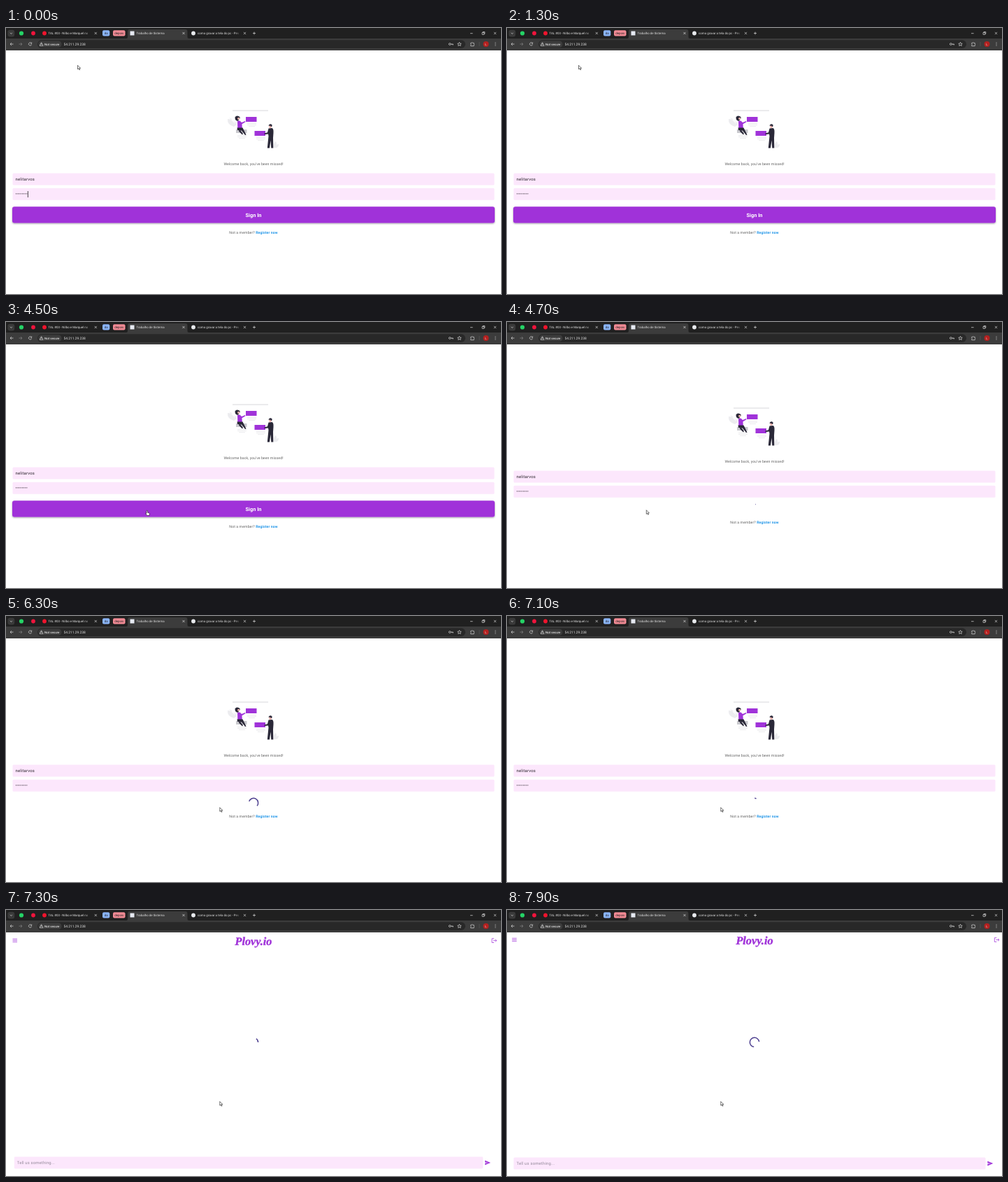
Recreate the animation shown at these times as an HTML page. Size 708 by 380 pixels, loop 8000 ms.

```html
<!DOCTYPE html>
<html lang="en">
<head>
<meta charset="utf-8">
<title>Sign in</title>
<style>
  html, body { margin: 0; width: 100%; height: 100%; overflow: hidden; background: #fff; }
  svg { display: block; width: 100vw; height: 100vh; }
  text { font-family: Roboto, sans-serif; text-rendering: geometricPrecision; white-space: pre; }
  .tab { font-size: 4.43px; fill: #e3e3e3; }
  .body { font-size: 5.17px; letter-spacing: .092px; fill: #616161; }
  .input { font-size: 5.9px; letter-spacing: .185px; fill: #2b252d; }
  .mid { text-anchor: middle; }
  .field { fill: #fce7fc; }
  .purple { fill: #a033d9; }
  .dark { fill: #2a2838; }
  .pale { fill: #e4e4e7; }
  .icon { fill: none; stroke: #dcdcdc; stroke-width: .7; }
  .accent { fill: none; stroke: #a033d9; stroke-width: .75; }
  .spin { fill: none; stroke: #4d3f8f; stroke-width: 1.5; }
</style>
</head>
<body>
<svg viewBox="0 0 708 380" preserveAspectRatio="none">
  <defs>
    <linearGradient id="fade">
      <stop offset="0" stop-color="#202020" stop-opacity="0"/>
      <stop offset=".8" stop-color="#202020"/>
    </linearGradient>
    <filter id="shadow" x="-5%" y="-30%" width="110%" height="180%">
      <feDropShadow dx="0" dy="1" stdDeviation="1" flood-color="#000" flood-opacity=".38"/>
    </filter>
    <path id="close" d="M-1.6-1.6 1.6 1.6M1.6-1.6-1.6 1.6"/>
    <path id="lines" d="M0 0H13M0 2H13M2 4H11" stroke="#e0e0e3" stroke-width=".6"/>
  </defs>
  <rect width="708" height="380" fill="#fff"/>

  <g id="login">
    <g id="upper">
      <g id="art">
        <path class="pale" d="M324 117.3h51v1.5h-51z"/>
        <path d="M317 130q-1 8 9 11l4-3q-3-8-13-8zM319 128q6 2 9 9" fill="#ececef"/>
        <path d="M383 171q-1-7 3-9 2 3 0 9zM386 171q0-5 4-5 0 4-3 5z" fill="#ececef"/>
        <path class="purple" d="M343 127h15.5v7H343zM355.5 147H371v7h-15.5z"/>
        <use href="#lines" x="345" y="136.5"/>
        <use href="#lines" x="331" y="153.5"/>
        <use href="#lines" x="358" y="156.5"/>
        <path d="M329 145h15.5v5H329z" fill="#c9c9ce"/>
        <path class="dark" d="M327.5 127.5q2-3 5-1.6 2.6.6 2 3l-2 2.4q1 1.500-1.500 1.500-3.500-.4-3.500-5.300z"/>
        <circle cx="332.6" cy="129.300" r="1.500" fill="#efb3ad"/>
        <path class="purple" d="M331 133l3.500-.5 2.500 2.500 5-2 .5 1.200-5 3 .3 6h-6.500z"/>
        <path class="dark" d="M330.500 142.500h8l3 6 2 4-1.500.5-5-6.500-6-.5zM334 145l5 6-1 1.500-5-5z"/>
        <circle cx="378" cy="141" r="1.900" fill="#efb3ad"/>
        <path class="dark" d="M375.700 140q0-2.800 3-2.700 2.500.5 1.700 3.200l-1.300.4-1.200-1.300z"/>
        <path class="dark" d="M375.500 143.500l5-.5q2.500 1 2 7l-.5 7 .3 14.500h-3l-.8-11-1.500 11h-3.200l1.700-17-.5-3-5.500.5v-1.500l4.500-1.200z"/>
      </g>
      <text class="body mid" x="354" y="196.200">Welcome back, you've been missed!</text>
      <rect class="field" x="9.500" y="207.500" width="689" height="17" rx="1.500"/>
      <rect class="field" x="9.500" y="228.800" width="689" height="17" rx="1.500"/>
      <text class="input" x="13.500" y="218">nelitarvos</text>
      <text class="input" x="13.500" y="239.400">••••••••</text>
      <rect id="caret" x="30.900" y="233" width=".8" height="9" fill="#222"/>
    </g>
    <g id="button">
      <rect class="purple" x="9" y="255.300" width="690" height="23.300" rx="3" filter="url(#shadow)"/>
      <text class="mid" x="354" y="269.600" font-size="7.38" font-weight="700" fill="#fff">Sign In</text>
    </g>
    <path id="loginSpin" class="spin"/>
    <text id="register" class="body mid" x="354" y="293.500">Not a member? <tspan font-weight="700" fill="#2196e8">Register now</tspan></text>
  </g>

  <g id="home">
    <rect y="32" width="708" height="348" fill="#fff"/>
    <path class="accent" d="M7.200 40.400h6.600M7.200 42.500h6.600M7.200 44.600h6.600"/>
    <text class="mid purple" x="354" y="49.200" style="font:italic 700 16.300px 'Liberation Serif',serif" stroke="#a033d9" stroke-width=".4">Plovy.io</text>
    <path class="accent" d="M700.300 39.700h-3v5.800h3M699.300 42.600h4.600M702.200 40.800l1.800 1.800-1.800 1.800"/>
    <path id="homeSpin" class="spin"/>
    <rect class="field" x="9.500" y="353.500" width="675" height="17" rx="1.500"/>
    <text class="input" x="13.500" y="364" style="fill:#94899a">Tell us something...</text>
    <path class="purple" d="M687.300 358.800l8 3.300-8 3.300v-2.600l5-.7-5-.7z"/>
  </g>

  <g id="browser">
    <rect width="708" height="32" fill="#202020"/>
    <path d="M0 15H172q2 0 2-2V5q0-3 3-3h79.500q3 0 3 3v8q0 2 2 2H708v17H0z" fill="#3c3c3c"/>
    <rect x="2.500" y="2.700" width="9.700" height="9.700" rx="2.800" fill="#3a3a3a"/>
    <path class="icon" d="M5.800 6.800l1.600 1.600L9 6.800"/>
    <circle cx="22" cy="7.500" r="3.100" fill="#25d366"/>
    <circle cx="39" cy="7.500" r="2.900" fill="#f0143c"/>
    <circle cx="55" cy="7.500" r="2.900" fill="#f0142d"/>
    <text class="tab" x="60.500" y="9.100">TAL #03 - Nilbo e Marquel no</text>
    <rect x="112" y="3" width="13" height="9" fill="url(#fade)"/>
    <rect x="138" y="3.200" width="10.300" height="8.300" rx="2" fill="#8ab4f8"/>
    <text class="tab mid" x="143.100" y="9" style="fill:#202020">da</text>
    <rect x="153" y="3.200" width="17.500" height="8.300" rx="2" fill="#f28b95"/>
    <text class="tab mid" x="161.800" y="9" style="fill:#202020">depois</text>
    <rect x="177.500" y="4.500" width="6" height="6" fill="#e6eaf2"/>
    <text class="tab" x="186.500" y="9.100">Trabalho de Sistema</text>
    <circle cx="268" cy="7.500" r="2.900" fill="#e8eaed"/>
    <text class="tab" x="274" y="9.100">como gravar a tela do pc - Pes</text>
    <rect x="327" y="3" width="11" height="9" fill="url(#fade)"/>
    <g class="icon">
      <use href="#close" x="128.300" y="7.500"/>
      <use href="#close" x="254" y="7.500"/>
      <use href="#close" x="341.500" y="7.500"/>
      <use href="#close" x="699.500" y="7.500"/>
      <path d="M353 7.500h4M355 5.500v4M664 7.700h3.600M681 6.500h2.800v2.800H681zM682 6.400v-.9h2.800v2.800h-.9"/>
      <path d="M10.500 23H6M8 21l-2 2 2 2"/>
      <path d="M18.500 23H23M21 21l2 2-2 2" stroke="#868686"/>
      <path d="M36.300 21.700a2.100 2.100 0 1 0 .3 1.800M36.700 20.500v1.700H35"/>
    </g>
    <rect x="45" y="17.300" width="612" height="11.700" rx="5.850" fill="#282828"/>
    <rect x="46.200" y="18.500" width="33.300" height="9.300" rx="4.650" fill="#3c3c3c"/>
    <path d="M50.600 20.700l2.500 4.500h-5z" class="icon"/>
    <path d="M50.600 22.200v1.500" class="icon" stroke-width=".5"/>
    <text class="tab" x="55" y="24.700" font-weight="500">Not secure</text>
    <text x="82.500" y="24.800" font-size="4.900" fill="#e3e3e3">54.211.29.238</text>
    <g class="icon">
      <circle cx="634.800" cy="23" r="1.400"/>
      <path d="M636.200 23h3.300v1.400M638 23v1.200"/>
      <path d="M648.500 20.400l.8 1.700 1.900.2-1.400 1.300.4 1.900-1.700-1-1.700 1 .4-1.900-1.400-1.300 1.900-.2z"/>
      <path d="M664.700 21.400h1.400q.7-1.800 1.500 0h1.600v1.500q1.700.7 0 1.500v1.300h-4.500v-1.400q1-.7 0-1.500z"/>
      <path d="M677 20v6" stroke="#626262" stroke-width=".5"/>
    </g>
    <circle cx="686.500" cy="23" r="4" fill="#b5201f"/>
    <text class="tab mid" x="686.500" y="24.700">L</text>
    <path d="M700 21v.01M700 23v.01M700 25v.01" stroke="#e3e3e3" stroke-width="1" stroke-linecap="round"/>
  </g>

  <g id="pointer" fill="#fff" stroke="#111" stroke-width=".6" stroke-linejoin="round">
    <path id="arrow" d="M0 0v5.600l1.300-1.200 1 2.200 1-.5-1-2h1.800z"/>
    <path id="hand" d="M.8 0q.8 0 .8 .8v2.200l2 .5q.9.300.8 1.200l-.5 2.500H.800L-1.200 4.500q-.2-1 .6-.8l.6.500V.8Q0 0 .8 0z"/>
  </g>
</svg>
<script>
const LOOP = 8000, STEP = 100;
const LOADING = 4650, SWITCH = 7144, SWITCH_TIME = 300;
const caretToggles = [300, 800, 1300, 1800, 2400, 2900, 3400, 3900, 4400];
// Pointer stops: time, x, y
const pointerStops = [
  [0, 102.5, 53.3], [2300, 102.5, 53.3], [2500, 96.3, 51.2], [3300, 96.3, 51.2],
  [3500, 505, 103], [3800, 505, 103], [4500, 201, 269.3], [4600, 201, 269.3],
  [4700, 199.3, 268.7], [5000, 199.3, 268.7], [5800, 305.8, 273.6], [LOOP, 305.8, 273.6]
];
const $ = id => document.getElementById(id);
const clamp = v => Math.min(1, Math.max(0, v));

function bezier(x1, y1, x2, y2) {
  const at = (a, b, s) => 3 * a * s * (1 - s) ** 2 + 3 * b * s * s * (1 - s) + s ** 3;
  return x => {
    let lo = 0, hi = 1;
    for (let i = 0; i < 24; i++) {
      const s = (lo + hi) / 2;
      if (at(x1, x2, s) < x) lo = s; else hi = s;
    }
    return at(y1, y2, lo);
  };
}
const standard = bezier(.4, 0, .2, 1);
const zoomOut = bezier(.05, .7, .1, 1);
const smooth = p => p * p * (3 - 2 * p);

// Material indeterminate spinner
function spinnerPath(cx, cy, time) {
  const r = 6.65, p = time / 1333 % 1;
  const head = standard(clamp(p * 2)), tail = standard(clamp(p * 2 - 1));
  const start = Math.PI * (-.5 + tail * 1.5 + time / 2222 * 2 + p * .5);
  const sweep = Math.max((head - tail) * 1.5 * Math.PI, .08);
  const point = a => `${cx + r * Math.cos(a)} ${cy + r * Math.sin(a)}`;
  return `M${point(start)}A${r} ${r} 0 ${+(sweep > Math.PI)} 1 ${point(start + sweep)}`;
}

const show = (id, on) => $(id).setAttribute('visibility', on ? 'inherit' : 'hidden');
const move = (id, x, y) => $(id).setAttribute('transform', `translate(${x} ${y})`);

function layer(id, scale, opacity) {
  $(id).setAttribute('transform', `translate(354 206) scale(${scale}) translate(-354 -206)`);
  $(id).setAttribute('opacity', opacity);
}

function render(t) {
  const loading = t >= LOADING && t < SWITCH;
  move('upper', 0, loading ? 5 : 0);
  move('register', 0, loading ? -5.2 : 0);
  show('button', !loading);
  show('loginSpin', loading);
  if (loading) $('loginSpin').setAttribute('d', spinnerPath(354, 267, t - LOADING));
  show('caret', caretToggles.filter(at => at <= t).length % 2 === 0);

  const p = clamp((t - SWITCH) / SWITCH_TIME);
  const zoom = p < 1 / 6 ? p * 2.4 : .4 + .6 * zoomOut((p - 1 / 6) * 1.2);
  layer('login', 1 - .045 * zoom, 1 - clamp((p - .0825) / .13));
  layer('home', .85 + .15 * zoom, clamp((p - .125) / .125));
  if (p) $('homeSpin').setAttribute('d', spinnerPath(354, 189, t - SWITCH));

  const next = pointerStops.findIndex(stop => stop[0] > t);
  const [t0, x0, y0] = pointerStops[next - 1], [t1, x1, y1] = pointerStops[next];
  const k = smooth((t - t0) / (t1 - t0));
  const x = x0 + (x1 - x0) * k, y = y0 + (y1 - y0) * k;
  const overButton = !loading && p === 0 && y > 255;
  move('pointer', x, y);
  show('arrow', !overButton);
  show('hand', overButton);
}

const began = performance.now();
function tick() {
  const t = (performance.now() - began) % LOOP;
  render(Math.floor(t / STEP) * STEP);
  requestAnimationFrame(tick);
}
tick();
</script>
</body>
</html>
```
